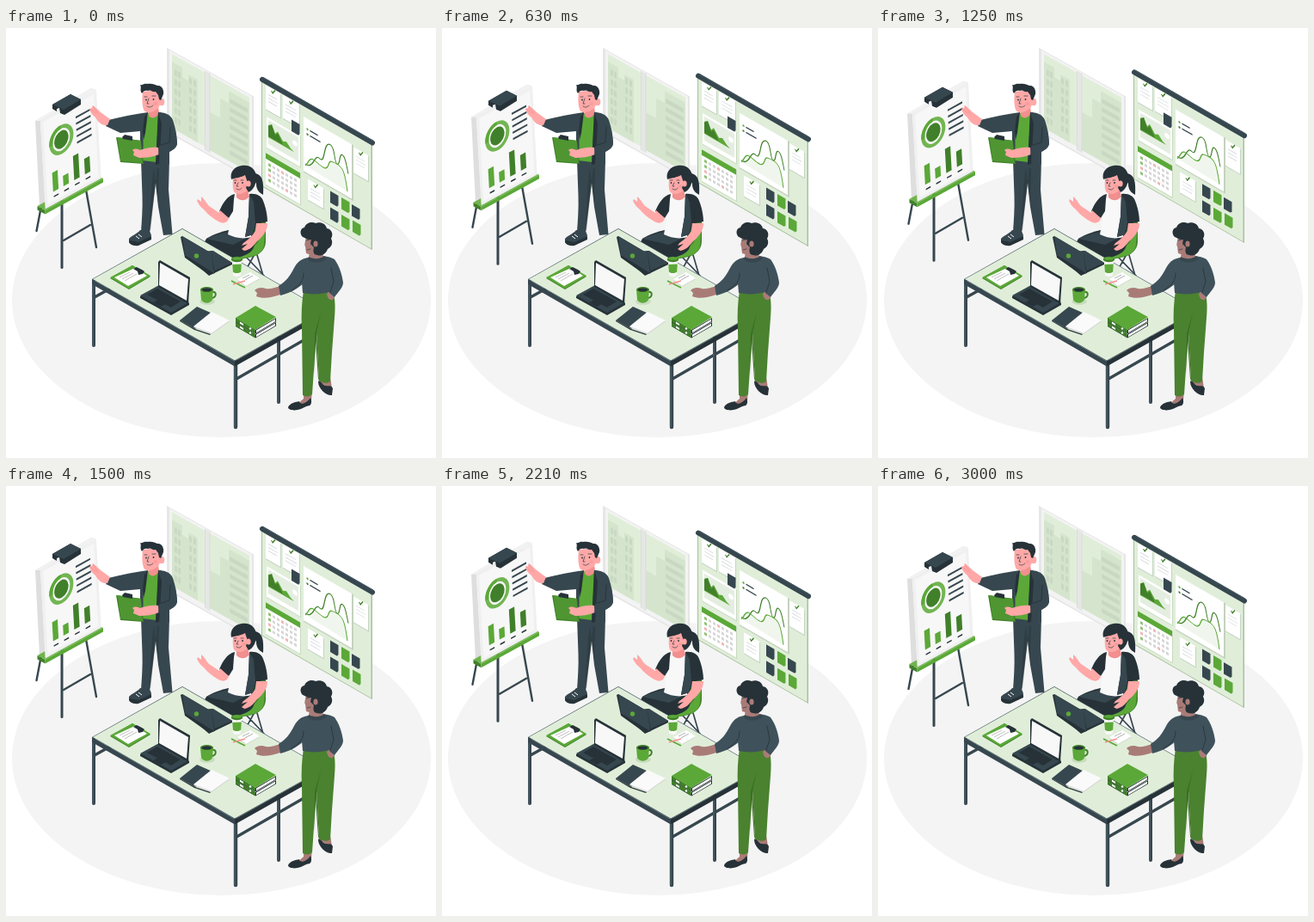
Write an HTML page that moves like this. It is 500 by 500 pixels and loops after 3.04 s.

```html
<!DOCTYPE html>
<html lang="en">
<head>
<meta charset="utf-8">
<title>Team meeting</title>
<style>
html, body { margin: 0; width: 100%; height: 100%; overflow: hidden; background: #fff; }
svg { display: block; width: 100vw; height: 100vh; }
.ink { fill: #263238; } .slate { fill: #37474f; } .steel { fill: #3f525b; }
.green { fill: #5ba838; } .deep { fill: #41802a; } .pale { fill: #e0eed9; }
.white { fill: #fff; } .skin { fill: #ffa8a7; } .blush { fill: #f28f8f; } .brown { fill: #a97b77; }
.line { fill: none; stroke: #37474f; stroke-linecap: round; stroke-linejoin: round; }
.thin { stroke-width: .8; }
</style>
</head>
<body>
<svg viewBox="0 0 500 500" xmlns="http://www.w3.org/2000/svg">
<ellipse cx="250.5" cy="316.500" rx="243.5" ry="159.5" fill="#f4f4f4"/>

<!-- window -->
<g transform="matrix(1 .56 0 1 187 23)">
  <rect width="101" height="98" fill="#e6e6e6"/>
  <rect x="3" y="1" width="96" height="95" fill="#f3f3f3"/>
  <rect x="6" y="4" width="38.500" height="86" class="pale"/>
  <rect x="50" y="4" width="46" height="87" class="pale"/>
  <path d="M6 13h12v11h7v-7h11v73H6zM50 47h12v-23h10v-14h24v81H50z" fill="#d5e5cd"/>
  <g id="panes" fill="#c9d8c3"></g>
  <rect x="44.500" y="2" width="5.500" height="92" fill="#e6e6e6"/>
  <path d="M44.500 2v92M50 2v92" stroke="#d8d8d8" stroke-width=".6"/>
</g>

<!-- pinned board -->
<g id="board">
  <g transform="matrix(1 .577 0 1 298 64)">
    <rect x="-1" y="-2" width="129" height="122.500" fill="#a9c09f"/>
    <rect x="0" y="-2" width="126.500" height="121.500" class="pale"/>
    <g id="papers"></g>
    <!-- picture -->
    <rect x="5" y="36" width="40" height="37" fill="#c9d9c2"/>
    <rect x="5" y="36" width="39" height="36" class="white"/>
    <rect x="7" y="39" width="35" height="28" fill="#e4eee0"/>
    <path d="M7 59V45l4-3 4 8 3-4 6 8 4-2 5 5 4 2z" class="green"/>
    <path d="M7 58V46l4-4 4 10 3-4 6 10z" class="deep"/>
    <circle cx="38" cy="48" r="3" class="white"/>
    <!-- calendar -->
    <rect x="4" y="79" width="41" height="37.500" fill="#c9d9c2"/>
    <rect x="4" y="79" width="40" height="36.500" class="white"/>
    <rect x="4" y="79" width="40" height="6.500" class="green"/>
    <g id="days"></g>
    <!-- graph -->
    <rect x="48" y="11" width="58" height="65" fill="#c4d2be"/>
    <rect x="48" y="11" width="56" height="63.500" class="white"/>
    <path d="M50 67c3-3 4-11 8-12 4-1 8 3 14 2s4-10 8-12c3-1 4-1 7-1 6 0 9 3 12 25z" fill="#f0f6ed"/>
    <path class="line" stroke-width="1.500" d="M56 23.500h8M56 29.500h11"/>
    <circle cx="52.500" cy="23.500" r="1.200" class="green"/><circle cx="52.500" cy="29.500" r="1.200" class="deep"/>
    <path d="M50 65c4 1 6-2 8-5 3-5 4-11 7-11 3 0 3 2 5-1 3-5 2-21 9-22 6 0 4 17 8 18 4 0 2-14 6-14s5 10 7 18" fill="none" stroke="#41802a" stroke-width="1.100"/>
    <path d="M50 67c3-3 4-11 8-12 4-1 8 3 14 2s4-10 8-12c3-1 4-1 7-1 6 0 9 3 12 25" fill="none" stroke="#5ba838" stroke-width="1.100"/>
    <g id="notes"></g>
  </g>
  <path d="M298 59.800 426 133.500" class="line" stroke-width="6"/>
  <path d="M299 57.500 427 131" fill="none" stroke="#4b5e67" stroke-width="1"/>
</g>

<!-- easel -->
<g id="easel">
  <path class="line" stroke-width="2.400" d="M41 207 35.500 236M93 188l12 67M67 247l31-18"/>
  <path class="line" stroke-width="3" stroke-linecap="butt" d="M65 200v78.500"/>
  <path d="M34 108 99 70l6 2-65 37 6 101-7-2z" fill="#dedede"/>
  <path d="M34 108 99 70l6 2-65 36z" fill="#f2f2f2"/>
  <path d="m36.500 207 9 5v4.500l-9-5z" class="deep"/>
  <path d="m36.500 207 67-36 9.500 4-67.500 37z" fill="#6fb44d"/>
  <path d="m45.500 212 67.500-37v4.500l-67.500 37z" class="green"/>
  <g transform="matrix(1 -.55 .055 1 40 108)">
    <rect width="65" height="102.500" fill="#f0f0f0"/>
    <rect x="3" y="3" width="59" height="96" fill="#f7f7f7"/>
    <ellipse cx="22.500" cy="34" rx="12" ry="14.500" fill="none" stroke="#72b552" stroke-width="4"/>
    <path d="M22.500 19.500a12 14.500 0 0 0-12 16" fill="none" stroke="#5ba838" stroke-width="4"/>
    <ellipse cx="22.500" cy="34" rx="8.300" ry="10" class="deep"/>
    <g id="chart"></g>
  </g>
  <path d="m54 89 21-12 12 6v6l-19 12-5-2-1-6-3 1v3l-5-3z" class="ink"/>
  <path d="m54 89 21-12 12 6-20 12z" class="slate"/>
</g>

<!-- presenter -->
<g>
  <path d="M143 245c3-4 9-5 13-10l11 1 2 5-2 5-13 6c-5 2-11-1-11-3z" class="slate"/>
  <path d="m143 247 11 2 15-7v4l-15 7c-6 1-11-2-11-6z" class="ink"/>
  <path d="m151 242 4 3m-1-5 4 3" stroke="#fff" stroke-width="1"/>
  <path d="M157 153h33l-1 35 4.500 52-10.500 1-6-33-3-28-7 57c-4 3-7 2-10 0 1-14 2-28 1.500-42z" class="slate"/>
  <path d="m174 180-6 55-2 2 4-60 2-14zM174 180l2-18 2 2-1 40z" class="ink" opacity=".45"/>
  <path d="m165 99 13-2 3 18-6 41-17-2 2-34z" class="green"/>
  <path d="m165 94 12-3 1 8c-3 6-9 7-12 3z" class="blush"/>
  <path d="M165 98c-15 2-30 5-46 9l-3 7 17 8 23-2v34l3 1 1-35z" class="slate"/>
  <path d="m165 98-4 5-2 17 1 10 2-8z" class="ink"/>
  <path d="M177 98c7 0 14 2 17 9 3 9 5 19 5 27-1 5-5 8-9 10v14c-5 2-10 2-16 1l2-36z" class="slate"/>
  <path d="m177 98 4 13-3 47-4 1 2-42z" class="ink"/>
  <path d="M118 113c-7 1-11-4-14-9-4-3-6-6-7-10l3-1 1-3c3 2 6 5 9 8l11 8z" class="skin"/>
  <path d="m98 94 6 5m-3-8 6 9" class="line thin" style="stroke:#f28f8f"/>
  <path d="m128 127 29 4 3 27-27-2z" class="deep"/>
  <path d="m129.500 127 27 4 2 26-25-2.500z" fill="#4f9632"/>
  <path d="m135 127 3-3 9 2v5l-11-2z" class="ink"/>
  <path d="M177 139c-8-1-15 1-21 3-4-2-7-2-9 0l2 2-1 4 7 3c8 0 15-1 23-4z" class="skin"/>
  <path d="m178 137 12-5 1-17 6 4 2 15c0 8-12 11-22 14z" class="slate"/>
  <path d="m191 115-1 18-12 4" class="line thin" style="stroke:#263238"/>
  <path d="M159 74c-1 8-1 15 1 21 2 4 8 4 13 1 5-2 7-7 7-15l-3-9z" class="skin"/>
  <ellipse cx="181" cy="86" rx="3.300" ry="4.200" class="skin"/>
  <path d="M158 76c-3-4 0-6-2-10 3 1 4-2 8-1 6-1 9 1 12 2 5-1 8 5 7 10l-3 7-2-1-1-5-3-4c-4 1-6-3-9-1-3-1-5 0-7 3z" class="ink"/>
  <path d="M161 80h3m6-1h4M164 91c2 2 5 1 7-1M166 82l-2 6h2" class="line thin"/>
  <circle cx="163" cy="83.500" r=".9" class="ink"/><circle cx="171.500" cy="83" r=".9" class="ink"/>
  <circle cx="174" cy="88" r="2" class="blush" opacity=".5"/>
</g>

<!-- seated colleague -->
<g>
  <path d="m279 266 21 22m-12-23-10 18m14-19 7 24" class="line" stroke-width="1.700"/>
  <path d="M291 211c8 0 12 6 11 18v19c0 9-6 15-15 18l-15 3-6-9z" class="deep"/>
  <path d="M291 224 294 246c-2 9-16 13-27 17l7 5c13-2 25-5 26-16l2-24z" class="green"/>
  <path d="M262 234c-12 3-21 6-29 11-4 5-2 13 4 19l28 4c12-3 23-6 24-17l-3-15z" class="ink"/>
  <path d="M262 236c-12 3-21 5-29 9l31 7 20-10z" class="slate"/>
  <path d="m264 195 20-3 4 15-3 36c-9 3-19 1-27-3l4-22-1-15z" fill="#f8f8f8"/>
  <path d="M268 188h13l2 8c-4 5-10 6-15 1z" class="blush"/>
  <path d="M266 193c-9 2-14 11-18 20l11 8 5-8 1-14z" class="ink"/>
  <path d="m249 212 10 9c-1 6-7 7-12 4-7-4-12-8-17-14-4-3-6-6-8-10l1-2 4 3v-6c4 3 6 8 9 11l12 8z" class="skin"/>
  <path d="M283 193c8-1 14 2 16 8 3 7 5 17 5 24l-13 3-3 12-10 3 4-23z" class="ink"/>
  <path d="m283 193 5 9 2 25-3 13-9 3 4-24z" class="slate"/>
  <path d="M291 227h13c0 9-5 15-13 22-3 4-7 9-14 10l-3-2 7-6-7 2 2-3c7-5 11-9 14-14z" class="skin"/>
  <path d="M290 169c8 2 10 9 9 25-5-3-8-6-8-13l-4-7z" class="ink"/>
  <path d="M264 172c0 7-1 13 1 18 3 5 11 3 16-1l4-12-6-9z" class="skin"/>
  <path d="M262 176c-2-8 3-15 12-16 10-2 17 5 17 13 0 9-3 15-9 18l-3-5 2-6-3-9c-5 3-10 3-16 5z" class="ink"/>
  <ellipse cx="282" cy="181" rx="2.700" ry="3.500" class="skin"/>
  <path d="M265 177h3m5 0h3M268 187c3 2 5 1 6-1M270 180l-2 4h2" class="line thin"/>
  <circle cx="266.500" cy="180" r=".9" class="ink"/><circle cx="275" cy="180" r=".9" class="ink"/>
  <circle cx="277" cy="184" r="1.800" class="blush" opacity=".6"/>
</g>

<!-- table -->
<g>
  <path class="line" stroke-width="4" stroke-linecap="butt" d="M102 294v75M317 360v75M367 326v80"/>
  <path class="line" stroke-width="3.200" d="m103 313 18-10M268 408l99-57"/>
  <path class="line" stroke-width="4.400" stroke-linecap="butt" d="M267 388v76"/>
  <path d="M101 296v73M266 390v74M316 364v71" stroke="#607079" stroke-width=".7"/>
  <path d="m100 292 166 95.500v6L100 298z" class="slate"/>
  <path d="m266 387.500 105-59v6l-105 59z" class="ink"/>
  <path d="m100 292 105-59 166 95.500-105 59z" class="steel"/>
  <path d="m101 292 104-58.300 165 94.700-104 58z" class="pale"/>
</g>

<!-- clipboard -->
<path d="m121 291 26-15 21 13-25 15z" class="deep"/>
<path d="m121 290 26-14 21 12-25 15z" class="green"/>
<path d="m126 290 24-11 14 9-22 12z" class="white"/>
<path d="m132 290 12-6m-9 8 13-7m-10 9 14-8" stroke="#b0b0b0" stroke-width=".8"/>
<path d="m148 280 4-2 6 3 3 2-2 3-5 1-1-4z" class="ink"/>

<!-- open laptop -->
<path d="m156 312 22-12 35 20v2l-21 12-36-20z" class="ink"/>
<path d="m156 311 22-12 35 20-21 12z" class="slate"/>
<path d="m164 310 12-7 27 15-11 7zM171 319l6-3 9 5-6 3z" class="ink"/>
<path d="m177 272 2-2 35 20-2 31-35-20z" class="ink"/>
<path d="m179 273 33 19-2 25-32-18z" fill="#f8f8f8"/>

<!-- laptop seen from behind -->
<path d="m207 262 33-3 23 14v2l-27 13z" class="ink"/>
<path d="m227 263 14-4 22 14-27 12z" class="slate"/>
<path d="m203 243 2-1 34 20 4 23-7 2-28-20z" class="ink"/>
<path d="m205 242 34 20 3 23-34-21z" class="slate"/>
<circle cx="221.500" cy="265" r="2.700" class="green"/>

<!-- paper cup -->
<path d="m263 270 11-1-1 18c-2 3-7 3-9 0z" fill="#f7f7f7"/>
<path d="m263.300 275 10.500-.5-.6 9c-3 2-7 2-9.300 0z" class="green"/>
<path d="M262 270v-2c3-3 10-3 13 0v2c-3 3-10 3-13 0z" class="deep"/>
<ellipse cx="268.500" cy="268" rx="5.500" ry="1.800" class="green"/>

<!-- notepad and pencils -->
<path d="m269 293 15-8 11 7-16 9z" fill="#cfd8ca"/>
<path d="m269 292 15-8 11 7-16 9z" class="white"/>
<path d="m275 291 8-4m-5 6 9-5" stroke="#9a9a9a" stroke-width=".8"/>
<path d="m262 294 16 8" stroke="#5ba838" stroke-width="1.600"/>
<path d="m264 298 14-4" stroke="#f28f8f" stroke-width="1.400"/>

<!-- mug -->
<ellipse cx="234" cy="318" rx="9" ry="4" fill="#c8dcbe"/>
<path d="M239 307c7-2 6 8-1 7" fill="none" stroke="#41802a" stroke-width="2"/>
<path d="M226 304h15l-1 12c-3 5-10 5-13 0z" class="green"/>
<ellipse cx="233.500" cy="304" rx="7.500" ry="3" class="deep"/>
<ellipse cx="233.500" cy="304.500" rx="5.800" ry="2" class="ink"/>

<!-- notebook -->
<path d="m202 340 20-16 18 8-20 18z" class="slate"/>
<path d="m202 340 18 10 18 6-1 1-18-6-17-10z" class="ink"/>
<path d="m218 348 21-17 21 10-21 15z" fill="#cfcfcf"/>
<path d="m218 347 21-17 21 10-21 15z" fill="#fafafa"/>

<!-- binders -->
<g id="binders"></g>
<path d="m267 337 23-14 24 13-24 15z" class="green"/>

<!-- standing colleague -->
<g>
  <path d="m364 402 12-1 2 11 1 8-5-2-9-6z" class="brown"/>
  <path d="M363 411c2-3 5 5 9 5 4 1 6-1 8 3l-1 8c-6 1-16-7-16-16z" class="ink"/>
  <path d="M346 422h10l-1 11c-3 5-13 8-18 6l9-8z" class="brown"/>
  <path d="M328 441c2-5 9-6 13-7 1 5 8 3 13-4 2 4 1 8-1 9-6 1-8 4-14 5-5 1-11 0-11-3z" class="ink"/>
  <path d="M346 305h34c3 10 3 21 2 32l-3 40-2 34c-4 3-8 2-13-1l-3-56-5 72c-3 3-7 3-11 1l-1-78c-1-16 0-30 2-44z" fill="#4a822f"/>
  <path d="m366 331-5 24 3 55-1-2-3-45-2 40 1-48z" fill="#3c6f26"/>
  <path d="m384 304-3 11c-4 3-7 0-8-6l8-9z" class="brown"/>
  <path d="M349 268c8-4 25-4 33 1 6 8 9 19 10 27 0 6-6 11-10 17l-6-5v-1c-10 3-22 3-31 1l-2-24z" class="steel"/>
  <path d="M319 300c-7 2-12 4-17 3-5-2-10-1-13 2l3 3-1 4c7 3 17 2 28-2z" class="brown"/>
  <path d="M352 267c-9 1-13 5-17 12-5 10-10 16-18 21l2 11c12-3 21-8 30-17l7-18z" class="steel"/>
  <path d="M346 285c0 9-3 13-14 20M378 279l3 16-4 12" class="line thin" style="stroke:#263238"/>
  <path d="m353 258 15-2 1 12c-6 3-12 3-17-1z" class="brown"/>
  <path d="M352 266c5 3 14 3 18-1l3 3c-5 6-18 6-22 1z" class="slate"/>
  <path d="M350 239c-1 7-4 13-2 15l1 8c4 2 8 1 12-2l7-12-7-13z" class="brown"/>
  <path d="M345 243c-4-4-3-10 2-11 2-6 9-7 13-5 6-2 12 1 13 6 6 1 8 7 5 12 3 5 0 10-4 12-2 6-8 9-12 7-5 0-5-5-4-9l-4-4 1-5c-4 1-7-2-10-3z" class="ink"/>
  <ellipse cx="360" cy="251" rx="2.600" ry="3.500" class="brown"/>
  <path d="m349 247 4-1m-3 12 4-1" class="line thin"/>
</g>
</svg>
<script>
const $ = id => document.getElementById(id);
const rect = (x, y, w, h, cls = "", alpha = 1) =>
  `<rect x="${x}" y="${y}" width="${w}" height="${h}" class="${cls}" opacity="${alpha}"/>`;
const range = n => [...Array(n).keys()];

// window lights in the buildings
$("panes").innerHTML =
  range(24).map(i => rect([9, 13, 26, 31][i % 4], 20 + Math.floor(i / 4) * 11, 3, 7)).join("") +
  range(7).map(i => rect(73, 18 + i * 10, 21, 5)).join("");

// pinned sheets: x, y, width, height
$("papers").innerHTML = [[4, 0, 17, 28], [24, 0, 19, 27], [106, 13, 17, 30], [53, 81, 18, 24]]
  .map(([x, y, w, h]) =>
    rect(x, y + 1, w + .8, h, "steel", .2) + rect(x, y, w, h, "white") +
    range(3).map(i => rect(x + 3, y + 9 + i * 4, w - 7 + i % 2, .6, "steel", .3)).join("") +
    `<path d="M${x + w / 2 - 2} ${y + 3}l1.500 2 3-5" fill="none" stroke="#41802a" stroke-width="1.200"/>`)
  .join("");

$("days").innerHTML = range(28).map(i => {
  const col = i % 7, row = Math.floor(i / 7);
  const fill = (i * 5) % 11 === 4 ? "#f2b5b5" : col ? "#d6d6d6" : "#8fc374";
  return `<rect x="${7 + col * 5}" y="${89 + row * 6}" width="3" height="3.200" fill="${fill}"/>`;
}).join("");

const notes = [[34, 23, "slate"], [79, 80, "slate"], [92, 80, "green"], [104, 81, "slate"],
  [79, 99, "slate"], [92, 100, "green"], [105, 99, "green"]];
$("notes").innerHTML = notes.map(([x, y, cls]) =>
  `<path d="M${x} ${y}h9.500v11l-1.500 2.500h-8z" class="${cls}"/>`).join("");

const bars = [[10, 66, "green"], [22, 76, "green"], [34.5, 60, "deep"], [47, 70, "deep"]];
$("chart").innerHTML =
  range(5).map(i => rect(40, 17 + i * 7.3, 17, 2.2, "slate")).join("") +
  bars.map(([x, y, cls]) => rect(x, y, 6.3, 88 - y, cls) + rect(x + .5, 93, 5.5, 1.6, "ink")).join("");

// two stacked binders, the lower one first
$("binders").innerHTML = [5, 0].map(y => `<g transform="translate(0 ${y})">
  <path d="m267 337 23 14 24-14v4.500l-24 14-23-13.500z" class="ink"/>
  <path d="m267 337 23 14v4l-23-13.500z" class="deep"/>
  <path d="m291 351.500 22-13v2.700l-22 13zM272 341.500l4 2.400v2.200l-4-2.400z" class="white"/>
  <circle cx="284" cy="349.500" r="1.200" class="white"/></g>`).join("");

// linear float, 24 steps a second, resting for the last step
const LOOP = 3040, STEPS = 72, LIFT = 10;
function draw(now) {
  const step = Math.min(STEPS, Math.floor((now % LOOP + 5) * .024));
  const rise = LIFT * (1 - Math.abs(1 - step / (STEPS / 2)));
  for (const id of ["board", "easel"]) $(id).setAttribute("transform", `translate(0 ${-rise})`);
}
const start = performance.now();
function tick() {
  draw(performance.now() - start);
  requestAnimationFrame(tick);
}
tick();
</script>
</body>
</html>
```
